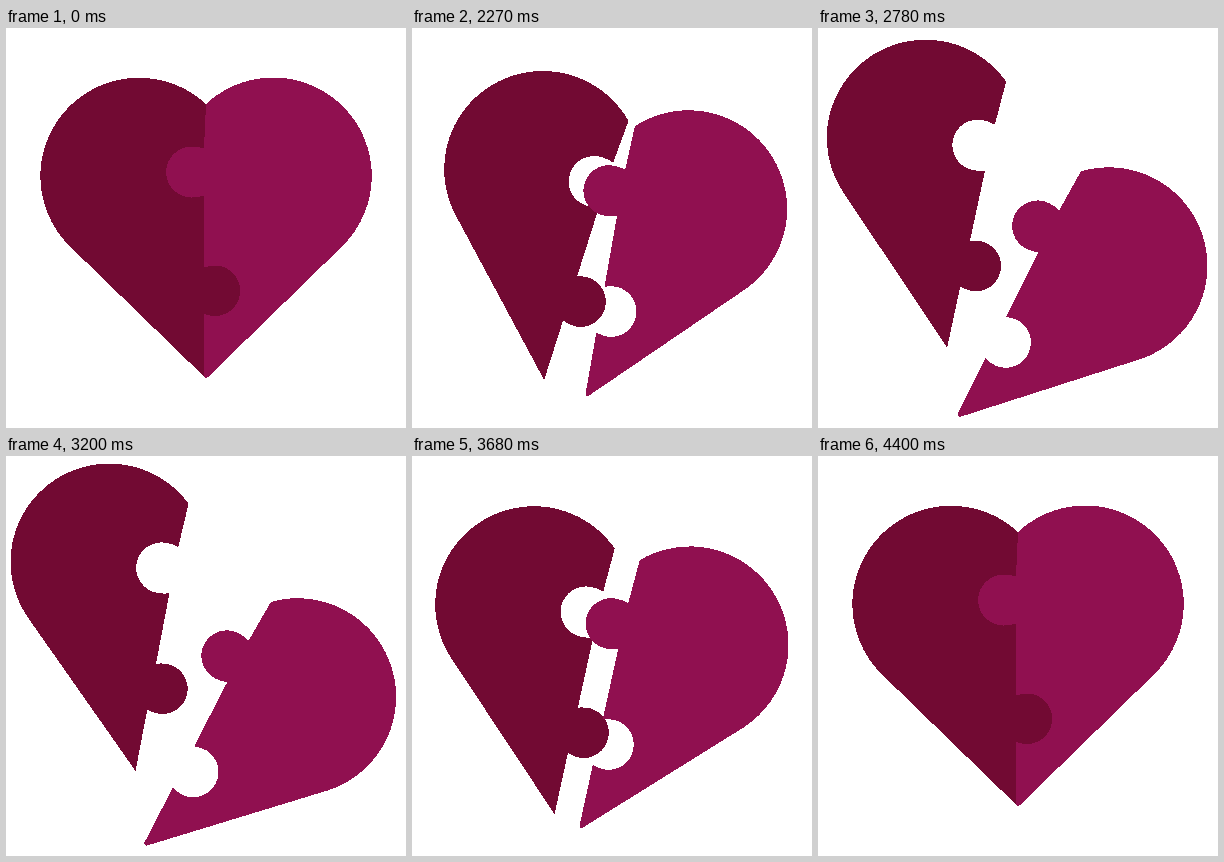
Recreate the animation shown at these times as an HTML page. Size 400 by 400 pixels, loop 4430 ms.

```html
<!DOCTYPE html>
<html lang="en">
<head>
<meta charset="utf-8">
<title>Puzzle heart</title>
<style>
  html, body { margin: 0; width: 100%; height: 100%; overflow: hidden; background: #fff; }
  svg { display: block; width: 100%; height: 100%; shape-rendering: crispEdges; }
</style>
</head>
<body>
<svg viewBox="0 0 400 400">
  <path id="left" fill="#720a33"/>
  <path id="right" fill="#901050"/>
</svg>
<script>
const LOOP = 4430, STEP = 30, OFFSET = 20;

const left = document.getElementById('left');
const right = document.getElementById('right');

// Both halves share the seam, from the top notch down to the tip.
const seam = 'M200 76L198 120.5C194 119 190 118.7 185.5 118.7A25.4 25.4 0 0 0 185.5 169.5' +
  'C190 169.5 194 169 198 167.5V239.5C202 238 206 237.5 210.5 237.5' +
  'A25.3 25.3 0 0 1 210.5 288C206 288 202 287.5 198 286V348.5';
left.setAttribute('d', seam +
  'L199 349.5L63 217.5A98.7 98.7 0 0 1 34.3 148A98.7 98.7 0 0 1 200 76Z');
right.setAttribute('d', seam +
  'Q200 351.5 202 349L337.5 217A98.6 98.6 0 0 0 365.8 148.6A98.6 98.6 0 0 0 200 76Z');

// Cubic timing curve with end heights 0 and 1.
function bezier(x1, x2) {
  return t => {
    let lo = 0, hi = 1, s = t;
    for (let i = 0; i < 30; i++) {
      s = (lo + hi) / 2;
      const x = 3 * (1 - s) ** 2 * s * x1 + 3 * (1 - s) * s * s * x2 + s ** 3;
      if (x < t) lo = s; else hi = s;
    }
    return s * s * (3 - 2 * s);
  };
}

const smooth = bezier(.33, .67);
const glide = bezier(.33, .2);
const spread = bezier(.33, .53);
const dart = bezier(.3, .1);
const close = bezier(.4, .67);
const swing = bezier(.72, .63);
const spin = bezier(.7, .62);

// Segments: [start, end, value reached, easing]; every track begins at 0.
const track = (...segments) => t => {
  let from = 0;
  for (const [start, end, to, ease] of segments) {
    if (t <= start) return from;
    if (t < end) return from + (to - from) * ease((t - start) / (end - start));
    from = to;
  }
  return from;
};

const body = {
  x: track([2000, 3000, 1, glide], [3560, 4000, -6, smooth], [4000, 4400, 0, smooth]),
  y: track([2000, 3000, 85, glide], [3200, 4000, -21.5, swing], [4000, 4400, 0, smooth]),
  turn: track([2000, 3000, 27.3, glide], [3200, 4000, -5.4, spin], [4000, 4400, 0, smooth])
};

// The left half moves relative to the right one.
const split = {
  x: track([2040, 3000, -95, spread], [3200, 3920, 0, close]),
  y: track([2040, 3000, -33.5, dart], [3200, 3860, 0, smooth]),
  turn: track([2000, 2360, 9, smooth], [2360, 3000, -16.5, glide], [3200, 3680, 0, smooth])
};

const pose = (part, t, cx, cy) =>
  `translate(${part.x(t)} ${part.y(t)}) rotate(${part.turn(t)} ${cx} ${cy})`;

function draw(now) {
  const t = Math.floor((now % LOOP - OFFSET) / STEP) * STEP + OFFSET;
  const base = pose(body, t, 263, 200);
  right.setAttribute('transform', base);
  left.setAttribute('transform', base + pose(split, t, 133, 148));
}

const begin = performance.now();
function tick() {
  draw(performance.now() - begin);
  requestAnimationFrame(tick);
}
tick();
</script>
</body>
</html>
```
